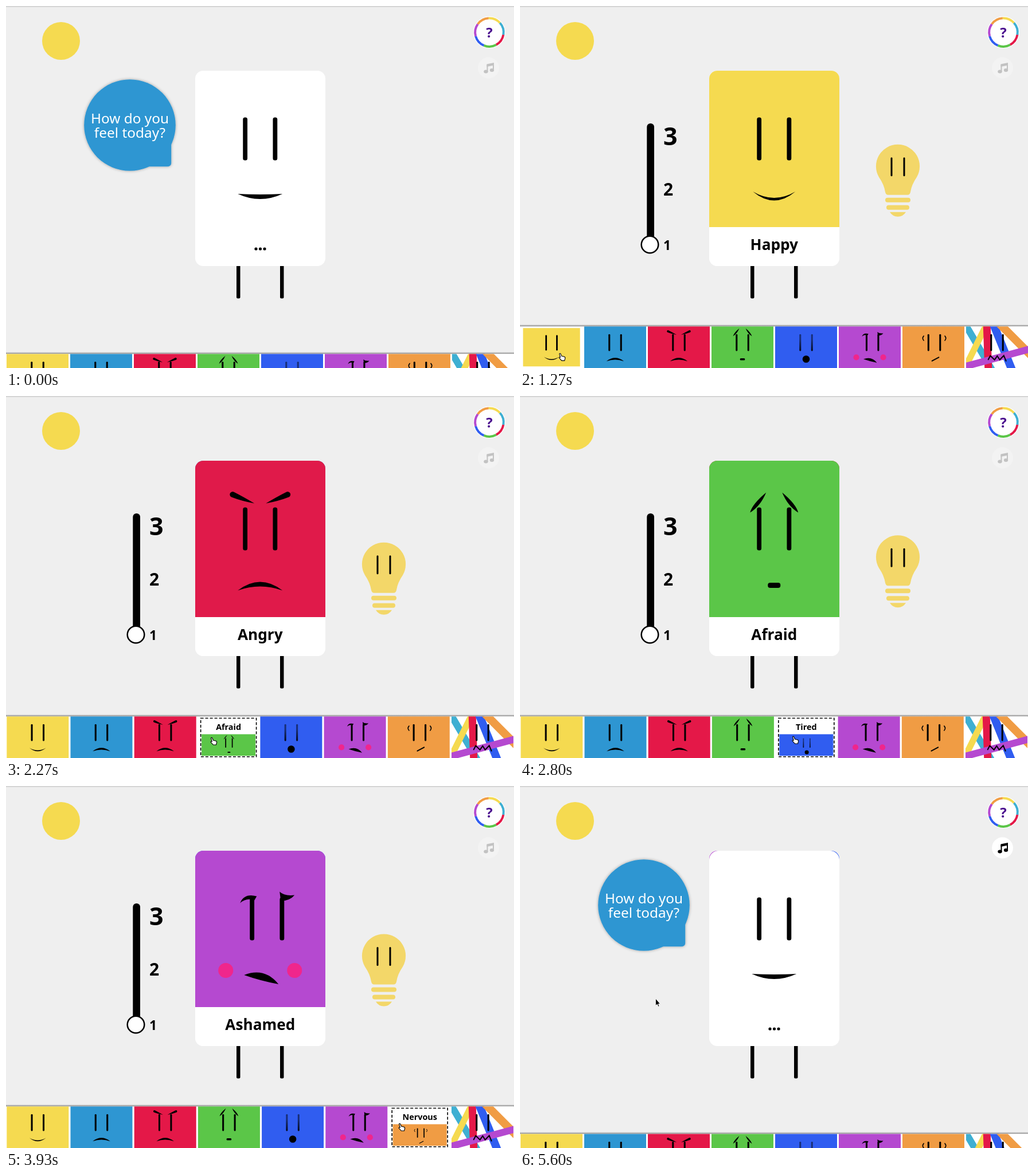
Animation, 886 px wide and 632 px high, one loop 5.67 s. Source, as an HTML page:

```html
<!DOCTYPE html>
<html lang="en">
<head>
<meta charset="utf-8">
<title>How do you feel today?</title>
<style>
html, body { margin: 0; width: 100%; height: 100%; overflow: hidden; background: #efefef; }
svg { display: block; }
text { font-family: "Noto Sans", "Open Sans", sans-serif; font-weight: 700; }
.mid { text-anchor: middle; }
</style>
</head>
<body>
<svg width="100%" height="100%" viewBox="0 0 886 632">
  <defs>
    <clipPath id="card"><rect x="330" y="113" width="227" height="341" rx="14"/></clipPath>
    <linearGradient id="lid" x2="0" y2="1">
      <stop offset=".3" stop-opacity=".5"/><stop offset="1" stop-opacity=".9"/>
    </linearGradient>
    <linearGradient id="edge" x2="0" y2="1">
      <stop stop-color="#777" stop-opacity="0"/><stop offset="1" stop-color="#777"/>
    </linearGradient>
    <filter id="soft" x="-20%" y="-20%" width="140%" height="140%">
      <feDropShadow dx="0" dy="0" stdDeviation="2.5" flood-opacity=".35"/>
    </filter>
  </defs>
  <rect width="886" height="632" fill="#efefef"/>
  <rect width="886" height="2" fill="#d6d6d6"/>
  <circle cx="96" cy="61" r="33" fill="#f5da50"/>
  <circle cx="843" cy="46" r="28" fill="#fff"/>
  <g id="ring" fill="none" stroke-width="4"></g>
  <text class="mid" x="843" y="55" font-size="24" fill="#4b0f8f">?</text>
  <g id="scene"></g>
</svg>
<script>
const LOOP = 5670;
const YELLOW = '#f5da50', BLUE = '#2e96d2', RED = '#e41848', GREEN = '#5bc648',
      ROYAL = '#305df0', PURPLE = '#b549d0', ORANGE = '#f09c44', CYAN = '#3eafd2';
const MOODS = [['Happy', YELLOW], ['Sad', BLUE], ['Angry', RED], ['Afraid', GREEN],
  ['Tired', ROYAL], ['Ashamed', PURPLE], ['Nervous', ORANGE], ['Confused', '#fff']];
const NEUTRAL = -1, SAD = 1, ANGRY = 2, AFRAID = 3, TIRED = 4, ASHAMED = 5, NERVOUS = 6, CONFUSED = 7;

// [time, mood] of every selection, then [start, end] of every tile hover
const PICKS = [[0, NEUTRAL], [1050, 0], [1600, 1], [2075, 2], [2450, 3], [3158, 4],
  [3550, 5], [4050, 6], [4330, 7], [5350, NEUTRAL]];
const HOVERS = [[620, 1250], [1400, 1715], [1790, 2140], [2215, 2650], [2800, 3380],
  [3440, 3720], [3820, 4200], [4270, 4680]];
const TRAY = [[480, 48], [720, 0], [5100, 0], [5380, 48]];
const CURSOR = [[400, 60, 500], [620, 42, 615], [1200, 42, 615], [1400, 150, 605], [1600, 150, 605],
  [1730, 242, 605], [2080, 245, 605], [2240, 362, 602], [2500, 362, 602], [2800, 480, 600],
  [3180, 480, 600], [3330, 578, 599], [3600, 578, 599], [3820, 690, 595], [4070, 690, 595],
  [4270, 786, 585], [4600, 786, 585], [5100, 237, 378]];

const clamp = v => Math.max(0, Math.min(1, v));
const path = (d, attrs = '') => `<path d="${d}" ${attrs}/>`;
const line = (d, width, color = '#000') =>
  path(d, `fill="none" stroke="${color}" stroke-width="${width}" stroke-linecap="round"`);
const rect = (x, y, w, h, fill = '#000', r = 0, attrs = '') =>
  `<rect x="${x}" y="${y}" width="${w}" height="${h}" rx="${r}" fill="${fill}" ${attrs}/>`;
const circle = (x, y, r, fill = '#000', attrs = '') =>
  `<circle cx="${x}" cy="${y}" r="${r}" fill="${fill}" ${attrs}/>`;
const text = (s, x, y, size, attrs = '') =>
  `<text x="${x}" y="${y}" font-size="${size}" ${attrs}>${s}</text>`;
const group = (attrs, body) => `<g ${attrs}>${body}</g>`;
const mirror = s => s + group('transform="scale(-1 1)"', s);

function track(keys, t) {
  const n = keys.findIndex(k => k[0] > t);
  if (n <= 0) return keys[n < 0 ? keys.length - 1 : 0].slice(1);
  const a = keys[n - 1], b = keys[n], u = (t - a[0]) / (b[0] - a[0]), e = u * u * (3 - 2 * u);
  return a.slice(1).map((v, i) => v + (b[i + 1] - v) * e);
}

// Origin: middle of the eye tops. my: mouth height, open: how far the eyes are open.
function face(mood, my, open = 1, ink = '#000') {
  const h = 75 * open, top = 37.5 + 10 * (1 - open) - h / 2;
  const eyes = mirror(rect(-30, top, 7.8, h, ink, open < 1 ? 2 : 3.5));
  const shift = mood === ASHAMED ? 12 : mood === NERVOUS ? 4 : 0;
  const frown = mirror(path('M-10-7Q-32-11-50-18a4.5 4.5 0 0 1 4-9Q-30-19-10-7'));
  const brows = {
    [ANGRY]: group(`transform="translate(0 ${(135.5 - my) * .4})"`, frown),
    [AFRAID]: mirror(path('M-14-26Q-24-2-42 9Q-38-6-14-26')),
    [ASHAMED]: path('M-47 10Q-40-8-18-2L-22 5Q-36 0-47 10M22-10Q30-2 48-4Q40 6 24 6z'),
    [NERVOUS]: mirror(line('M-47 8Q-56 18-47 28', 4)),
  }[mood] || '';
  const mouth = {
    [NEUTRAL]: path('M-39-2Q0 0 39-2Q0 16-39-2'),
    0: path('M-37-6Q0 16 37-6Q0 25-37-6'),
    [SAD]: path('M-39 9.5Q0-20.5 39 9.5Q0-4.5-39 9.5'),
    [ANGRY]: path('M-39 9.5Q0-20.5 39 9.5Q0-4.5-39 9.5'),
    [AFRAID]: rect(-11, -4, 22, 9, '#000', 4),
    [TIRED]: circle(0, 0, 16),
    [ASHAMED]: circle(-60, -8, 13, '#f0268c') + circle(60, -8, 13, '#f0268c') +
      path('M-28 0Q8-14 32 16Q0 10-28 0'),
    [NERVOUS]: line('M-6 8L24-8', 5),
    [CONFUSED]: line('M-39 2L-30-15L-11 3L1-14L12 3L30-16L40 8', 5),
  }[mood];
  return group(`transform="translate(${shift})"`, eyes + brows) +
    group(`transform="translate(0 ${my})"`, mouth);
}

const cardStripes = [
  ['M370 113H557V160H480L383 128z', ROYAL], ['M330 113H386L330 191z', PURPLE],
  ['M330 222L501 123L555 212L500 214L330 312z', ORANGE], ['M386 113H467L427 318L355 276z', CYAN],
  ['M517 260L557 326L460 386H330V373z', RED], ['M492 150L557 139V386H526z', GREEN],
  ['M330 261L424 323L381 387L330 356z', YELLOW],
].map(([d, c]) => path(d, `fill="${c}"`)).join('');

const tileStripes = [
  ['M-4-8L48 80', 12, CYAN], ['M38-8L-6 80', 11, YELLOW], ['M36-8L39 80', 13, RED],
  ['M46-8L82 80', 14, ROYAL], ['M55-8L125 62', 14, ORANGE], ['M-8 71L115 38', 12, PURPLE],
].map(a => line(...a)).join('');

function cardFill(mood) {
  if (mood === NEUTRAL) return rect(330, 113, 227, 341, '#fff', 16);
  return rect(330, 113, 227, 273, MOODS[mood][1]) + (mood === CONFUSED ? cardStripes : '');
}

function card(mood, before, age) {
  const u = (age / 540) * 2 * Math.PI;
  const open = mood === TIRED ? .5 + .5 * Math.cos(u) : 1;
  const dots = [436, 443.5, 451].map(x => circle(x, 424, 2.6)).join('');
  const foot = mood === NEUTRAL ? dots : rect(330, 386, 227, 68, '#fff') +
    text(MOODS[mood][0], 443.3, 426, 26.2, 'class="mid"');
  return rect(402, 440, 6.5, 70.5, '#000', 2) + rect(478, 440, 6.5, 70.5, '#000', 2) +
    rect(330, 113, 227, 341, '#fff', 14) +
    group('clip-path="url(#card)"',
      cardFill(before) + group(`opacity="${clamp(age / 200)}"`, cardFill(mood)) + foot) +
    group('transform="translate(443.25 194.5)"', face(mood, mood === TIRED ? 111.5 : 135.5, open));
}

const bubble = group('filter="url(#soft)"',
    circle(216, 208, 79.8, BLUE) + rect(230, 222, 58.2, 58.2, BLUE, 6)) +
  ['How do you', 'feel today?'].map((s, i) =>
    text(s, 216, 205.3 + 24.2 * i, 24.4, 'class="mid" fill="#fff" style="font-weight:400"')).join('');

const scale = rect(221.3, 205, 12.7, 211, '#000', 6) +
  circle(226.5, 416.5, 14.8, '#fff', 'stroke="#000" stroke-width="2.5"') +
  text(3, 250, 243, 43) + text(2, 250, 330.5, 30) + text(1, 250, 426, 23);

function bulb(t) {
  const y = 254.5 + 13 * Math.cos((t - 1648.5) / 815 * 2 * Math.PI);
  return group(`transform="translate(659 ${y})" fill="#f3d769"`,
    path('M0 0A38 38 0 0 1 33 57Q24 70 22 83Q21 88 17 88H-17Q-21 88-22 83Q-24 70-33 57A38 38 0 0 1 0 0') +
    rect(-22, 93, 44, 8, '#f3d769', 4) + rect(-20, 106, 40, 8, '#f3d769', 4) +
    path('M-14 118H14Q9 126 0 126T-14 118') +
    mirror(line('M-11 24V54', 3)));
}

function music(on) {
  const c = on ? '#000' : '#c2c2c2';
  return circle(841.5, 108, 18.5, on ? '#fff' : '#f3f3f3') +
    group(`fill="${c}"`, path('M838.5 101.5L851 99V103.5L838.5 106z') +
      '<ellipse cx="837" cy="114.5" rx="3.7" ry="3"/><ellipse cx="847.5" cy="112" rx="3.7" ry="3"/>') +
    line('M839.5 114V103M850 112V101', 2, c);
}

function tile(i, t, hovered) {
  const [start, end] = HOVERS[i], on = i === hovered;
  const inset = clamp(t < end ? (t - start) / 70 + 1 : 1 - (t - end) / 100);
  // a hovered tile is narrower, so its neighbours spread out
  const spread = hovered < 0 ? 0 : .2 * i + (i > hovered ? -2.4 : .3);
  const x = 1 + 111 * i + spread + 5.5 * inset, w = 108 - 11 * inset;
  const y = on ? 590.5 : 559.5 + 3.5 * inset, h = on ? 38 : 72.5 - 7 * inset;
  const size = on ? .22 : .392 - .04 * inset;
  let out = rect(x, y, w, h, MOODS[i][1]);
  if (i === CONFUSED) out += `<svg x="${x}" y="${y}" width="${w}" height="${h}" viewBox="0 0 108 72" preserveAspectRatio="none">${tileStripes}</svg>`;
  out += group(`transform="translate(${x + w / 2} ${on ? 597.5 : 573 + 2 * inset}) scale(${size})"`,
    face(i, 111, 1, i === TIRED ? 'url(#lid)' : '#000'));
  if (on) {
    const frame = attrs => rect(x - .8, 562.5, w, 67.3, 'none', 0, attrs);
    out += frame('stroke="#fff" stroke-width="3"') +
      frame('stroke="#000" stroke-width="1.6" stroke-dasharray="5 3"') +
      text(MOODS[i][0], x - .8 + w / 2, 582.7, 14.4, 'class="mid"');
  }
  return out;
}

function tray(t) {
  const hovered = HOVERS.findIndex(([a, b]) => t >= a && t < b);
  return group(`transform="translate(0 ${track(TRAY, t)[0]})"`,
    rect(0, 556, 886, 3.5, 'url(#edge)') + rect(0, 559.5, 886, 80, '#fff') +
    MOODS.map((_, i) => tile(i, t, hovered)).join(''));
}

function cursor(t) {
  if (t < 400) return '';
  const [x, y] = track(CURSOR, t);
  const hand = path('M-4.5-5q1.5-1.5 2.5 .5l1.3 3.5 4.7 1.2q2 .8 1.5 2.8l-1 4h-5l-4.5-5q.3-1.8 2.2-.8z',
    'fill="#fff" stroke="#000" stroke-width="1.1"');
  const arrow = path('M-.5-7V5.5L2.3 3L4.2 7.2L6 6.4L4.2 2.4H7.5z', 'stroke="#fff" stroke-width=".8"');
  return group(`transform="translate(${x} ${y})"`, y > 556 ? hand : arrow);
}

function scene(t) {
  const n = PICKS.filter(p => p[0] <= t).length - 1;
  const [since, mood] = PICKS[n], before = n ? PICKS[n - 1][1] : NEUTRAL;
  const chosen = mood !== NEUTRAL;
  const fade = clamp((t - 1050) / 150);
  return music(t > 5250) + (chosen ? '' : bubble) + card(mood, before, t - since) +
    (chosen ? group(`opacity="${fade}"`, (mood === CONFUSED ? '' : scale) + bulb(t)) : '') +
    tray(t) + cursor(t);
}

document.getElementById('ring').innerHTML = [YELLOW, CYAN, RED, GREEN, ROYAL, PURPLE, ORANGE]
  .map((c, i) => circle(843, 46, 24.8, 'none', `stroke="${c}" pathLength="7" stroke-dasharray="1 6"
    transform="rotate(${i * 360 / 7 - 93} 843 46)"`)).join('');

const stage = document.getElementById('scene');
const begin = performance.now();
function draw() {
  stage.innerHTML = scene((performance.now() - begin) % LOOP);
  requestAnimationFrame(draw);
}
draw();
</script>
</body>
</html>
```
